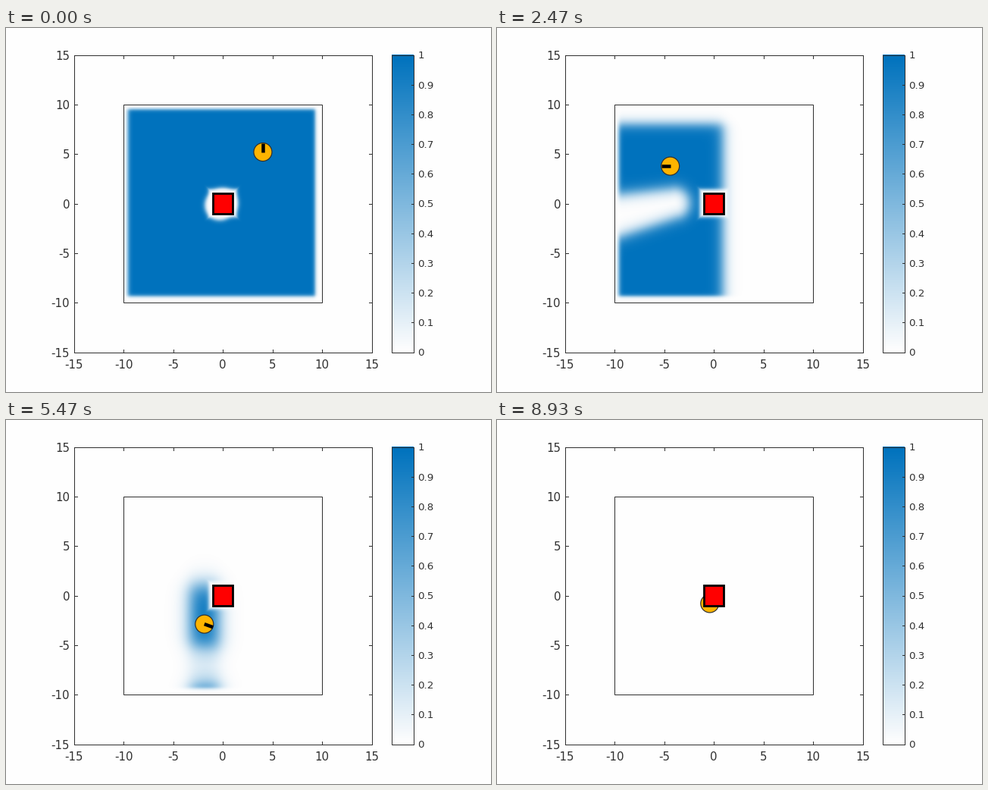
A matplotlib script for the animation above (9.07 s loop, 640 by 480 pixels).

```python
import numpy as np
import matplotlib.pyplot as plt
from matplotlib.animation import FuncAnimation
from matplotlib.colors import LinearSegmentedColormap
from matplotlib.patches import Circle, Rectangle

W, H, DPI = 640, 480, 100
LOOP, FRAMES = 9070, 136
PAUSES = {11, 12, 81, 93, 111, 123, 129, 130, 131, 135}
PAPER, INK = "#fefefe", "#303030"
PX = 72 / DPI
LEFT, RIGHT, TOP, BOTTOM = 89.5, 482.5, 35.5, 427.5
BAR_L, BAR_R = 508.5, 537.5
SPEED = 0.33  # units per tick

cmap = LinearSegmentedColormap.from_list("reach", [PAPER, "#0072bd"])

# Vehicle waypoints: tick, x, y, heading in degrees
WAYPOINTS = [(0, 4.04, 5.2, 90), (25, 0.62, 3.87, 184), (37, -4.38, 3.78, 180),
             (61, -7.05, 2.3, -55), (82, -1.85, -2.88, -20),
             (106, -2.85, -7.0, -110), (133, -0.4, -0.8, 63)]
T0, T1, T2, T3, T4, T5, T6 = TICKS = [p[0] for p in WAYPOINTS]

u = -10 + (np.arange(160) + 0.5) / 8
X, Y = np.meshgrid(u, u)


def px(x):
    return (LEFT + RIGHT) / 2 + x * (RIGHT - LEFT) / 30


def py(y):
    return (TOP + BOTTOM) / 2 - y * (BOTTOM - TOP) / 30


def ramp(t, a, b):
    return min(max((t - a) / (b - a), 0), 1)


def step(d, soft):
    return 0.5 * (1 + np.tanh(d / soft))


def vehicle(t):
    """Position and heading on a cubic Hermite path."""
    t = min(t, T6)
    i = min(np.searchsorted(TICKS, t, "right") - 1, len(TICKS) - 2)
    (ta, *p, ha), (tb, *q, hb) = WAYPOINTS[i:i + 2]
    s = (t - ta) / (tb - ta)
    p, q = np.array(p), np.array(q)
    v, w = (SPEED * (tb - ta) * np.array([np.cos(h), np.sin(h)])
            for h in np.radians([ha, hb]))
    pos = ((2*s**3 - 3*s**2 + 1) * p + (s**3 - 2*s**2 + s) * v
           + (3*s**2 - 2*s**3) * q + (s**3 - s**2) * w)
    vel = (6*s*s - 6*s) * (p - q) + (3*s*s - 4*s + 1) * v + (3*s*s - 2*s) * w
    return pos, np.arctan2(vel[1], vel[0])


def field(t, x):
    """Probability map: a soft window around the vehicle minus a shadow."""
    start, drift = ramp(t, T0, T1), ramp(t, T0, T2)
    narrow, grow = ramp(t, T2, T3), ramp(t, T3, T5)
    sink = ramp(t, T3, T4)

    soft = 0.7 + 0.5 * grow
    east = 7.3 - 2 * start - 4.3 * narrow + 0.9 * grow
    west = 16 - 15 * ramp(t, T1, T3) + 0.9 * grow
    cols = (step(u + 9.55, 0.25) * step(9.3 - u, 0.2)
            * step(u - x + west, soft) * step(x + east - u, soft))
    top = 9.45 - 1.5 * start - 1.75 * narrow - 11.1 * grow
    rows = (step(u + 9.35, 0.2)
            * step(top - u, 0.2 + 0.45 * start + 0.5 * narrow))

    # Tapered capsule shadow trailing from the obstacle
    ax_ = -4 * ramp(t, T1, T2) + 5 * sink
    ay = -1.1 * narrow - 6 * sink
    dx = -0.3 - 9.2 * drift**3 - ax_
    dy = -0.2 - 1.0 * drift - 6 * sink - ay
    s = np.clip(((X - ax_) * dx + (Y - ay) * dy) / (dx*dx + dy*dy), 0, 1)
    dist = np.hypot(X - ax_ - s * dx, Y - ay - s * dy)
    radius = 1.5 + 0.3 * sink + 0.6 * drift * s
    depth = 1 - 0.15 * sink - 0.85 * ramp(t, T4, T5)
    hole = depth * step(radius - dist, 0.25 + 0.5 * drift + 0.25 * narrow)

    wall = step(1.4 - np.maximum(abs(X), abs(Y)), 0.2)
    fade = 1 - ramp(t, T5, T6)
    return fade * np.outer(rows, cols) * (1 - hole) * (1 - wall)


fig = plt.figure(figsize=(W / DPI, H / DPI), dpi=DPI, facecolor=PAPER)
ax = fig.add_axes([0, 0, 1, 1])


def line(xs, ys, color=INK, width=1, **kw):
    return ax.plot(xs, ys, color=color, lw=width * PX, **kw)[0]


def frame(x0, y0, x1, y1, color=INK, width=1, fill="none", z=3):
    ax.add_patch(Rectangle((x0, y0), x1 - x0, y1 - y0, fc=fill, ec=color,
                           lw=width * PX, zorder=z))


def label(x, y, text, size, ha):
    ax.text(x, y, text, fontsize=size * PX, family="DejaVu Sans", color=INK,
            ha=ha, va="center_baseline")


def image(data, extent, **kw):
    return ax.imshow(data, cmap=cmap, vmin=0, vmax=1, extent=extent,
                     aspect="auto", zorder=1, **kw)


frame(LEFT, TOP, RIGHT, BOTTOM)
for v in range(-15, 16, 5):
    x, y = px(v), py(v)
    for edge, d in ((TOP, 4), (BOTTOM, -4)):
        line([x, x], [edge, edge + d])
    for edge, d in ((LEFT, 4), (RIGHT, -4)):
        line([edge, edge + d], [y, y])
    label(x, 443, str(v), 15, "center")
    label(84, y, str(v), 15, "right")

image(np.linspace(1, 0, 256)[:, None], (BAR_L, BAR_R, BOTTOM, TOP))
frame(BAR_L, TOP, BAR_R, BOTTOM)
for i in range(11):
    y = BOTTOM - i * (BOTTOM - TOP) / 10
    line([BAR_R - 3, BAR_R], [y, y], zorder=4)
    label(543.5, y, f"{i / 10:g}", 13.4, "left")

heat = image(np.zeros_like(X), (px(-10), px(10), py(-10), py(10)),
             origin="lower", interpolation="bilinear")
frame(px(-10), py(10), px(10), py(-10))
body = ax.add_patch(Circle((0, 0), 12, fc="#ffb400", ec=INK, lw=1.2 * PX, zorder=5))
nose = line([], [], "black", 4.5, zorder=6, solid_capstyle="butt")
frame(px(-1), py(1), px(1), py(-1), color="black", width=2.8, fill="#ff0000", z=7)
ax.set(xlim=(0, W), ylim=(H, 0))
ax.axis("off")


def update(n):
    while n in PAUSES:
        n -= 1
    (x, y), a = vehicle(n)
    heat.set_data(field(n, x))
    cx, cy = px(x), py(y)
    body.center = cx, cy
    nose.set_data([cx, cx + 12 * np.cos(a)], [cy, cy - 12 * np.sin(a)])
    return heat, body, nose


anim = FuncAnimation(fig, update, frames=FRAMES, interval=LOOP / FRAMES,
                     repeat=True, repeat_delay=0, blit=False)
plt.show()
```
